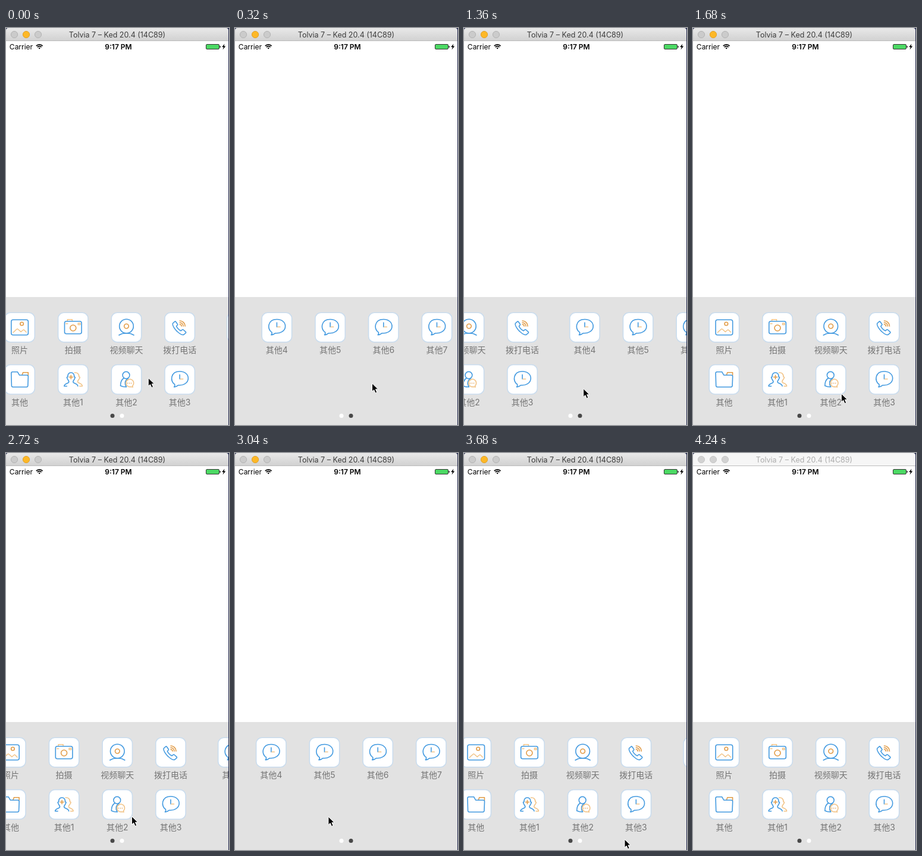
An HTML page for the animation above (4320 ms loop, 375 px wide and 667 px high).

```html
<!DOCTYPE html>
<html lang="zh-CN">
<head>
<meta charset="utf-8">
<title>Paged icon panel</title>
<style>
html, body { margin: 0; width: 100%; height: 100%; overflow: hidden; background: #fff; }
svg { display: block; position: absolute; left: 0; top: 0; }
text { font-family: Inter, "Noto Sans CJK SC", "Noto Sans CJK", sans-serif; text-anchor: middle; }
.label { font-size: 14px; fill: #757575; }
.tile { fill: #fff; stroke: #c9dcee; stroke-width: 1.6; }
.icon { fill: none; stroke: #439ae0; stroke-width: 1.6; stroke-linecap: round; stroke-linejoin: round; }
.o { stroke: #e29c48; }
.p { stroke: #f2c58a; }
.light { fill: #cbcbcb; stroke: #b3b3b3; }
.title { font-size: 12.5px; fill: #3c3c3c; }
#amber { fill: #fdb827; stroke: #e0a02a; }
.idle #bar { fill: #f6f6f6; }
.idle .title { fill: #adadad; }
.idle .light, .idle #amber { fill: #d2d2d2; stroke: #c6c6c6; }
</style>
</head>
<body>
<svg id="stage" width="375" height="667" viewBox="0 0 375 667">
  <defs>
    <linearGradient id="shine" x2="0" y2="1">
      <stop stop-color="#e9e9e9"/><stop offset="1" stop-color="#d0d0d0"/>
    </linearGradient>
    <clipPath id="view"><path d="M0 452H374V667H0z"/></clipPath>

    <g id="photo">
      <rect x="-14.3" y="-12.8" width="28.6" height="25.6" rx="3"/>
      <circle class="o" cx="3.5" cy="-6" r="2.8"/>
      <path class="p" d="M-11 8.5L-5 3Q-4 2-3 3L2 7.500 5.500 4.500Q6.500 3.500 7.500 4.500L11 8"/>
    </g>
    <g id="camera">
      <path class="p" d="M-9.500-10.500v-2.700h8v2.700M-12-6.200h3M8.500-7h3.500v2.500h-3.500z"/>
      <rect x="-14.3" y="-10.3" width="28.6" height="21" rx="3"/>
      <circle class="o" cy="1" r="5"/>
    </g>
    <g id="webcam">
      <circle cy="-2" r="11.8"/>
      <circle class="o" cy="-2" r="3.8"/>
      <path d="M-12.500 13Q-7 9.500 0 9.800 7 9.500 12.500 13"/>
    </g>
    <g id="phone">
      <path d="M-8.500-9.700L-11.500-7C-13.500-4 -8 4-3 8 1 11.500 5 13.500 7 12L10 9.300Q10.800 8.300 9.800 7.300L6 4Q5 3.200 4 4L2 5.800C-1 4.300-4.300 1-5.700-2L-4-3.800Q-3.200-4.800-4-5.800L-6.700-9.500Q-7.500-10.500-8.500-9.700z"/>
      <path class="o" d="M0-5a3 3 0 0 1 3 3M0-8a6 6 0 0 1 6 6M0-11a9 9 0 0 1 9 9"/>
    </g>
    <g id="folder">
      <path class="o" d="M4-7.500L5.500-11.800H14.200V-7"/>
      <path d="M-14.300-10.500q0-2.300 2.300-2.300h8.200l3.200 5.500h12.600q2.300 0 2.300 2.300L13.700 10.500q-.2 2.200-2.400 2.200h-22.600q-2.200 0-2.400-2.200z"/>
    </g>
    <g id="people">
      <path class="p" d="M2.500-11.500C7.500-12 10-9 10-4.500L11.500-3.500C11-1.500 10-.5 8.500 1.500 7.500 3 7.500 4.500 9 5.500 12 7 15.500 7.500 15.500 11.300H11"/>
      <path d="M-10.500 11.300H-15C-15 7.500-11 7-8 5.500-6.500 4.500-7 3-8 1.500-9.500-.5-10-2-10.500-3.500L-9-4.500C-9-9-7-11.500-3.500-11.500S2-9 2-4.500L3.500-3.500C3-2 2.500-.5 1 1.500 0 3-.5 4.500 1 5.500 4 7 8 7.500 8 11.300"/>
      <path class="o" d="M-3.500-7v6M-6.500-4h6"/>
    </g>
    <g id="chat">
      <circle cx="-.5" cy="-7.200" r="5.900"/>
      <path d="M-4-2.500C-8 0-10 4.500-10 10.500Q-6 12.800 0 12.500M3-2C0 0-3 3-2 8Q-1.500 10.500 0 12.500"/>
      <path class="p" fill="#fff" d="M10 10.800A6.400 6.400 0 1 0 6.800 12.300L10.800 12.800z"/>
      <path class="o" d="M1.800 6.300h.1M4.900 6.300h.1M8 6.300h.1"/>
    </g>
    <g id="clock">
      <path d="M-8.500 8.200C-17 3-15.500-13.500 0-13.500 9-13.500 14.200-8 14.200-2 14.200 6 6 10.500-2.500 9.700-4.500 11.500-6.500 12.500-9.500 12.600-8.300 11.200-8 9.800-8.500 8.200z"/>
      <path d="M0-8V-.8"/>
      <path class="p" d="M1-.8H5.500"/>
    </g>
  </defs>

  <path fill="#fff" d="M0 5H374V667H0z"/>
  <path fill="#252a4d" d="M0 0H375V667H374V5H0z"/>
  <path id="bar" fill="url(#shine)" d="M0 22V4Q0 0 4 0H370Q374 0 374 4V22z"/>
  <path fill="#bcbcbc" d="M0 21H374v1H0z"/>
  <circle class="light" cx="14" cy="11" r="5.6"/>
  <circle id="amber" cx="34" cy="11" r="5.6"/>
  <circle class="light" cx="54" cy="11" r="5.6"/>
  <text class="title" x="187" y="15.5">Tolvia 7 – Ked 20.4 (14C89)</text>

  <text x="25.5" y="36" font-size="12">Carrier</text>
  <g transform="translate(56.2 35.5)" fill="none" stroke="#000" stroke-width="1.7">
    <path d="M-5.400-5.400A7.600 7.600 0 0 1 5.400-5.400M-3.400-3.400A4.800 4.800 0 0 1 3.400-3.400"/>
    <path fill="#000" stroke="none" d="M0 0L-1.700-1.700A2.400 2.400 0 0 1 1.700-1.700z"/>
  </g>
  <text x="189" y="36" font-size="12" font-weight="600">9:17 PM</text>
  <rect x="336.500" y="27.500" width="22" height="8" rx="1.500" fill="#4cd964" stroke="#333"/>
  <path d="M359.500 30q1.500 0 1.500 1.500t-1.500 1.500zM367.500 26.500L363.200 32h2.600l-1.300 4.500L369.300 30.500h-2.700z"/>

  <path fill="#e2e2e2" d="M0 452H374V667H0z"/>
  <g clip-path="url(#view)"><g id="pages"></g></g>
  <circle class="dot" cx="179" cy="651.5" r="3.5"/>
  <circle class="dot" cx="195" cy="651.5" r="3.5"/>
  <path id="cursor" stroke="#fff" stroke-linejoin="round" d="M0 0V13.800L3.200 10.900 5.600 16.300 8.200 15.200 5.900 9.900H10.200z"/>
</svg>
<script>
const LOOP = 4320, STEP = 80, PAGE = 374, SWIPE = 460;
const $ = id => document.getElementById(id);
const clamp = v => Math.min(1, Math.max(0, v));
const ease = k => k * k * (3 - 2 * k);

const others = Array.from({ length: 8 }, (_, n) => ['clock', '其他' + n]);
const items = [
  ['photo', '照片'], ['camera', '拍摄'], ['webcam', '视频聊天'], ['phone', '拨打电话'],
  ['folder', '其他'], ['people', '其他1'], ['chat', '其他2'], ...others.slice(3)
];

// Eight items per page, four per row
$('pages').innerHTML = items.map(([icon, label], i) => {
  const x = 52.4 + (i % 4) * 89.7 + Math.floor(i / 8) * PAGE;
  const y = 503 + Math.floor(i % 8 / 4) * 87.5;
  return `<g transform="translate(${x} ${y})">
    <rect class="tile" x="-25.2" y="-24.7" width="50.4" height="49.4" rx="9.5"/>
    <use class="icon" href="#${icon}"/>
    <text class="label" y="43">${label}</text></g>`;
}).join('');

// Swipes alternate between the next page and the previous one
const swipes = [-79, 1160, 2621, 3303];
function scrollAt(t) {
  const turned = swipes.reduce((sum, start, i) =>
    sum + (i % 2 ? -1 : 1) * ease(clamp((t - start) / SWIPE)), 0);
  const bounce = 8 * Math.sin(Math.PI * clamp((t - 920) / 240));
  return PAGE * turned + bounce;
}

// Resting points of the pointer: time, x, y
const stops = [
  [0, 239.3, 588], [320, 230.5, 597], [1040, 152, 597.5], [1680, 249.5, 614.5],
  [2720, 211.5, 610.5], [3080, 155, 611], [3440, 242.5, 610.5], [3840, 285, 670]
];
function pointerAt(t) {
  const next = stops.findIndex(s => s[0] > t);
  if (next < 0) return stops.at(-1).slice(1);
  const [t0, x0, y0] = stops[next - 1], [t1, x1, y1] = stops[next];
  const k = ease((t - t0) / (t1 - t0));
  return [x0 + (x1 - x0) * k, y0 + (y1 - y0) * k];
}

const dots = document.querySelectorAll('.dot');
function draw(t) {
  const offset = scrollAt(t);
  const page = Math.round(offset / PAGE);
  $('pages').setAttribute('transform', `translate(${-offset} 0)`);
  $('cursor').setAttribute('transform', `translate(${pointerAt(t)})`);
  dots.forEach((d, i) => d.setAttribute('fill', i === page ? '#484848' : '#fff'));
  $('stage').classList.toggle('idle', t >= 4080);
}

const start = performance.now();
function tick() {
  const t = (performance.now() - start) % LOOP;
  draw(Math.floor(t / STEP) * STEP);
  requestAnimationFrame(tick);
}
tick();
</script>
</body>
</html>
```
